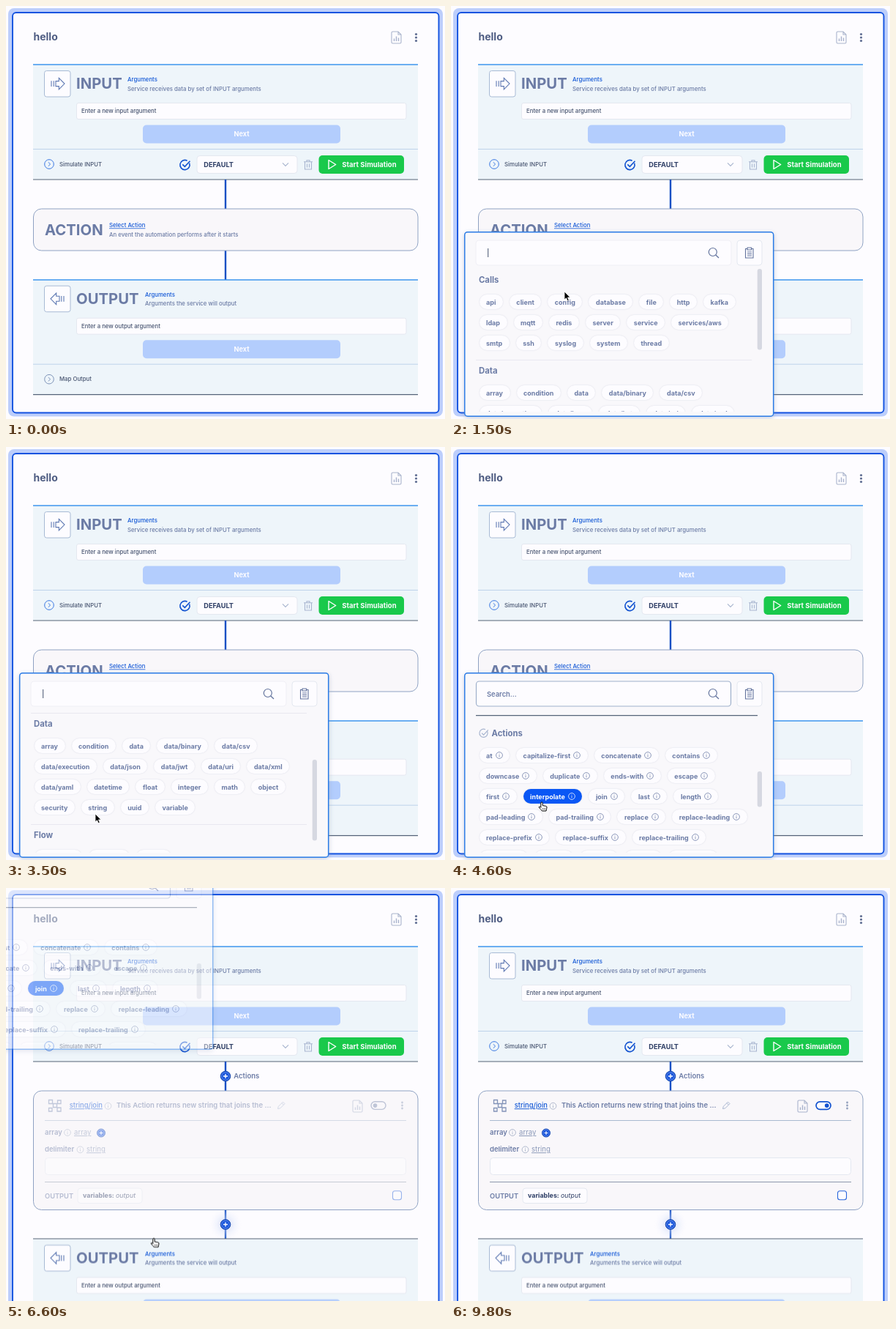
These frames come from a looping animation (600 by 564 pixels, 9900 ms). An HTML page:

```html
<!DOCTYPE html>
<html lang="en">
<head>
<meta charset="utf-8">
<title>Action picker</title>
<style>
html, body { margin: 0; width: 100%; height: 100%; overflow: hidden; background: #fdfcff; }
body { font-family: Inter, sans-serif; font-optical-sizing: none; }
#stage { position: relative; width: 600px; height: 564px; overflow: hidden; }
#stage > svg, #pop, #pop > svg { position: absolute; left: 0; top: 0; width: 600px; height: 564px; }
svg { display: block; overflow: visible; fill: none; }

/* type */
text { fill: #6b7ba5; }
.title { font-size: 20.3px; font-weight: 700; }
.small { font-size: 7.8px; font-weight: 500; }
.bold { font-size: 9.2px; font-weight: 700; }
.label { font-size: 9.5px; font-weight: 600; }
.type { font-size: 9.6px; fill: #8a98b8; text-decoration: underline; }
.link { fill: #1257d6; }
.dark { fill: #46536f; }
.navy { fill: #2f3f66; }
.white { fill: #fdfcff; }
.mid { text-anchor: middle; }

/* shapes */
.field { fill: #fdfcff; stroke: #e4e8f0; }
.card { fill: #f9f7fa; stroke: #8fa2c3; }
.wire { stroke: #1550c4; stroke-width: 2.4; }
.grey { stroke: #a9b6d0; }
.rule { stroke: #566479; stroke-width: 1.2; }
.sky { stroke: #3c96ee; stroke-width: 1.6; }

/* timeline: 1% is 99 ms */
.jump, .before, .after, .early, .late, .out, .on, .off, #kind, .arrow, .hand, .hot
  { animation: 9.9s step-end infinite; }
.before { animation-name: before; }
.after { animation-name: after; }
.out { animation-name: drop; }
.jump { animation-name: jump; }
.early { animation-name: early; }
.late { animation-name: late; }
.off { animation-name: off; }
.on { animation-name: on; }
.arrow { animation-name: arrow; }
.hand { animation-name: hand; }
#kind { animation-name: seen; }
.fade { animation: fade 9.9s linear infinite; }
#pop { animation: pop 9.9s linear infinite; }
.scroll { animation: scroll 9.9s ease-in-out infinite; }
#cursor { animation: move 9.9s ease-in-out infinite; }
.caret { animation: blink .99s step-end infinite; }
.hot.string { animation-name: string; }
.hot.interpolate { animation-name: interpolate; }
.hot.join { animation-name: join; }

@keyframes before { 0% { opacity: 1 } 65.15%, 100% { opacity: 0 } }
@keyframes after { 0% { opacity: 0 } 65.15%, 100% { opacity: 1 } }
@keyframes drop { 0% { transform: none } 65.15%, 100% { transform: translateY(105.5px) } }
@keyframes jump { 0% { transform: none } 65.15%, 100% { transform: translate(-158px, -340px) } }
@keyframes early { 0% { opacity: 1 } 40.4%, 100% { opacity: 0 } }
@keyframes late { 0% { opacity: 0 } 40.4%, 100% { opacity: 1 } }
@keyframes off { 0% { opacity: 1 } 70%, 100% { opacity: 0 } }
@keyframes on { 0% { opacity: 0 } 70%, 100% { opacity: 1 } }
@keyframes fade { 0%, 65.15% { opacity: 0 } 68.4%, 100% { opacity: 1 } }
@keyframes pop { 0%, 10.6% { opacity: 0 } 12.6%, 65.15% { opacity: 1 } 68.2%, 100% { opacity: 0 } }
@keyframes scroll { 0%, 21% { transform: none } 30%, 100% { transform: translateY(var(--by)) } }
@keyframes blink { 0% { opacity: 0 } 20% { opacity: 1 } 70%, 100% { opacity: 0 } }
@keyframes seen { 0% { opacity: 0 } 3% { opacity: 1 } 78%, 100% { opacity: 0 } }
@keyframes arrow { 0% { opacity: 1 } 8.1% { opacity: 0 } 11.1% { opacity: 1 } 36.4%, 100% { opacity: 0 } }
@keyframes hand { 0% { opacity: 0 } 8.1% { opacity: 1 } 11.1% { opacity: 0 } 36.4%, 100% { opacity: 1 } }
@keyframes move {
  0%, 3% { transform: translate(330px, 440px) }
  8.1%, 11.1% { transform: translate(165px, 301px) }
  14.1%, 19.2% { transform: translate(155px, 390px) }
  33.3%, 35.4% { transform: translate(122px, 501px) }
  37.4%, 49.5% { transform: translate(124px, 485px) }
  53.5%, 63.6% { transform: translate(196px, 483.5px) }
  66.2%, 70.7% { transform: translate(202px, 478.5px) }
  77.8%, 100% { transform: translate(206px, 580px) }
}
@keyframes string { 36.4% { background: #0a57f5; color: #fff } 40.4% { background: #fdfcff; color: #6b7ba5 } }
@keyframes interpolate { 40.4% { background: #0a57f5; color: #fff } 51.5% { background: #fdfcff; color: #6b7ba5 } }
@keyframes join { 51.5%, 100% { background: #0a57f5; color: #fff } }

/* picker */
.list { position: absolute; left: 34px; top: 358px; width: 385px; height: 196px; overflow: hidden; color: #6b7ba5; }
.list section { width: 377px; margin-top: -2px; padding-bottom: 9px; border-bottom: 1px solid #e9e8f0; }
.list section:first-child { margin-top: 0; }
.list.late section { margin-top: 17px; border: 0; }
h3 { margin: 0 0 0 4px; height: 32px; font: 700 11.3px/32px Inter, sans-serif; }
.late h3 { margin-left: 21.5px; }
.row { display: flex; align-items: center; gap: 9px; height: 28px; padding-left: 4.5px; }
.chip { display: flex; flex: none; align-items: center; gap: 4px; height: 19.5px; padding: 0 9.5px; border-radius: 10px;
  background: #fdfcff; box-shadow: 0 0 2px #d6d8e3; font-size: 9px; font-weight: 700; white-space: nowrap; }
.chip svg { width: 10px; height: 10px; opacity: .85; }
</style>
</head>
<body>
<div id="stage">
<svg viewBox="0 0 600 564">
  <defs>
    <radialGradient id="glow">
      <stop offset=".2" stop-color="#c9d5f5"/>
      <stop offset="1" stop-color="#f3f5fd" stop-opacity="0"/>
    </radialGradient>
    <g id="info" stroke="currentColor" stroke-width=".9">
      <circle cx="5" cy="5" r="4.4"/>
      <path d="M5 4.4V7.3M5 2.6V3.5"/>
    </g>
    <g id="plus">
      <circle r="6.8" fill="#1a56dc" stroke="#1747ab"/>
      <circle r="5.3" stroke="#88aaf0" stroke-width=".6"/>
      <path d="M-3 0H3M0-3V3" stroke="#fff" stroke-width="1.3"/>
    </g>
    <g id="report" stroke="#a9b3cc" stroke-width="1.1">
      <path d="M-6.5-6.5q0-1.5 1.5-1.5H2.5L6.5-4V6.5Q6.5 8 5 8H-5Q-6.5 8-6.5 6.5ZM2.5-8V-4H6.5"/>
      <path d="M-3 5V1.5M0 5V-1.5M3 5V.5" stroke-width="1.4"/>
    </g>
    <g id="more">
      <circle cy="-4.5" r="1.6"/><circle r="1.6"/><circle cy="4.5" r="1.6"/>
    </g>
    <g id="panel">
      <path d="M37 80H563V237H37Z" fill="#eef5fa"/>
      <path d="M37 195.5H563" stroke="#bed3ea"/>
      <path d="M37 237H563" class="rule"/>
      <rect x="52.5" y="88.5" width="35.5" height="35.5" rx="3" fill="#fdfcff" stroke="#a8bbd5"/>
      <rect x="96.5" y="132.5" width="450.5" height="22" rx="2.5" class="field"/>
      <rect x="187" y="162.5" width="270" height="25" rx="5" fill="#b3cdfd"/>
      <text x="322" y="178.3" class="bold white mid">Next</text>
      <circle cx="59" cy="216" r="6.3" stroke="currentColor"/>
      <path d="M57.8 213.3L60.6 216 57.8 218.7" stroke="currentColor"/>
    </g>
    <path id="way" d="M62 102.2V110M65.2 102.2V110M68 102.6H72.3V98.3L80 106.1 72.3 113.9V109.6H68Z"
      stroke="#5f79b3" stroke-width="1.1"/>
  </defs>

  <path d="M0 0H600V564H0Z" fill="#fdfcff"/>
  <g class="before">
    <rect x="3" y="3" width="594" height="557.5" rx="8" fill="#bccefb"/>
    <rect x="9" y="9" width="582.5" height="546.5" rx="5" fill="#fdfcff" stroke="#1353e0" stroke-width="1.9"/>
  </g>
  <g class="after">
    <rect x="3" y="3" width="594" height="663" rx="8" fill="#bccefb"/>
    <rect x="9" y="9" width="582.5" height="652" rx="5" fill="#fdfcff" stroke="#1353e0" stroke-width="1.9"/>
  </g>

  <text x="37.5" y="47" font-size="14" font-weight="700" style="fill:#4f5d83">hello</text>
  <use href="#report" x="533.5" y="43"/>
  <use href="#more" x="560.5" y="43" fill="#5f6d92"/>

  <use href="#panel" color="#3a78e2"/>
  <path d="M37 80H563" class="sky"/>
  <use href="#way"/>
  <text x="96" y="113.3" class="title">INPUT</text>
  <text x="166" y="103.2" class="small link">Arguments</text>
  <text x="166" y="115.8" class="small">Service receives data by set of INPUT arguments</text>
  <text x="103" y="146" class="small dark">Enter a new input argument</text>
  <text x="73" y="218.8" class="small dark">Simulate INPUT</text>
  <path d="M250.6 214.6A6.6 6.6 0 1 1 247.6 211.2M241.3 216.4L244.4 219.4 251.5 211.8" stroke="#1353d0" stroke-width="1.6"/>
  <rect x="261" y="204.5" width="137" height="24" rx="4" class="field"/>
  <text x="270.3" y="219.5" class="bold navy">DEFAULT</text>
  <path d="M378 214.3L382 218.3 386 214.3" class="grey" stroke-width="1.2"/>
  <path d="M407 212.8H419M411 212.6V210.8H415V212.6M408.5 213V223H417.5V213M411.5 215.5V220.5M414.5 215.5V220.5" class="grey" stroke-width="1.1"/>
  <rect x="427.5" y="204" width="116.5" height="25" rx="5" fill="#19c94b"/>
  <path d="M441 210.5V222.5L450.7 216.5Z" stroke="#fff" stroke-width="1.4" stroke-linejoin="round"/>
  <text x="459.3" y="219.8" class="bold white" style="font-size:9.5px">Start Simulation</text>
  <path d="M300 237V277" class="wire"/>

  <g class="before">
    <path d="M300 334V374" class="wire"/>
    <rect x="37.5" y="277" width="525.5" height="57" rx="11" class="card"/>
    <text x="53" y="312.5" class="title">ACTION</text>
    <text x="141" y="302.4" class="small link" text-decoration="underline">Select Action</text>
    <text x="141" y="315" class="small">An event the automation performs after it starts</text>
  </g>

  <g class="after">
    <path d="M300 439V479" class="wire"/>
    <circle cx="300" cy="459.5" r="22" fill="url(#glow)" opacity=".6"/>
    <use href="#plus" x="300" y="257"/>
    <use href="#plus" x="300" y="459.5"/>
    <text x="311.3" y="260.4" class="label">Actions</text>
    <rect x="37.5" y="277" width="525.5" height="162.5" rx="11" class="card"/>
    <g class="fade">
      <path d="M58.5 289.5h5v5h-5zM64.5 294.5h5v5h-5zM70.5 290h4.5v4.5h-4.5zM58.5 300.5h4.5v4.5h-4.5zM70 300h5v5h-5z" stroke="#8293b8" stroke-width="1.3"/>
      <text x="86.7" y="300.2" class="link" font-size="9.4" font-weight="500" text-decoration="underline">string/join</text>
      <use href="#info" x="134.5" y="292.7" color="#a9b3c8"/>
      <text x="151" y="300.2" class="label">This Action returns new string that joins the ...</text>
      <path d="M371.5 301.5L372.3 298.3 378.5 292.1 381 294.6 374.8 300.8ZM377 293.7L379.4 296.1" class="grey"/>
      <use href="#report" x="480.5" y="298"/>
      <g class="off">
        <rect x="499" y="291.8" width="20" height="10.6" rx="5.3" stroke="#7c8bb0" stroke-width="1.4"/>
        <circle cx="504.5" cy="297.1" r="2.8" fill="#7c8bb0"/>
      </g>
      <g class="on">
        <rect x="499" y="291.8" width="20" height="10.6" rx="5.3" fill="#fdfcff" stroke="#1353d0" stroke-width="1.7"/>
        <circle cx="513.7" cy="297.1" r="2.9" fill="#1353d0"/>
      </g>
      <use href="#more" transform="translate(541.5 297) scale(.9)" fill="#94a1bd"/>
      <path d="M53 317.5H547" stroke="#a9bad0"/>
      <text x="53" y="337" class="label">array</text>
      <use href="#info" x="79" y="329" color="#a9b3c8"/>
      <text x="93" y="337" class="type">array</text>
      <use href="#plus" transform="translate(130 334.5) scale(.82)"/>
      <text x="53" y="360.2" class="label">delimiter</text>
      <use href="#info" x="96.5" y="352.3" color="#a9b3c8"/>
      <text x="110" y="360.2" class="type">string</text>
      <rect x="53.5" y="368.5" width="493" height="23" rx="4" class="field"/>
      <path d="M53 401.5H547" stroke="#8d99ac"/>
      <text x="53" y="423.5" class="label" style="font-size:9.3px">OUTPUT</text>
      <rect x="98" y="410" width="88" height="20.5" rx="4" class="field"/>
      <text x="105" y="423.2" class="navy" font-size="8.9" font-weight="700">variables:</text>
      <text x="150" y="423.2" class="navy" font-size="8.9" font-style="italic">output</text>
      <rect x="528.5" y="413.7" width="12" height="12" rx="3" fill="#fdfcff" stroke="#2a66dc" stroke-width="1.1"/>
    </g>
  </g>

  <g class="out">
    <g transform="translate(0 293.7)">
      <use href="#panel" color="#7d93b8"/>
      <path d="M37 80H563" class="sky before"/>
      <path d="M37 80H563" class="rule after"/>
      <use href="#way" transform="matrix(-1 0 0 1 141 0)"/>
      <text x="96" y="113.3" class="title">OUTPUT</text>
      <text x="190" y="103.2" class="small link">Arguments</text>
      <text x="190" y="115.8" class="small">Arguments the service will output</text>
      <text x="103" y="146" class="small dark">Enter a new output argument</text>
      <text x="73" y="218.8" class="small dark">Map Output</text>
    </g>
  </g>
</svg>

<div id="pop">
<div class="jump">
  <svg width="600" height="564" viewBox="0 0 600 564">
    <rect x="18.7" y="308.7" width="422" height="251.5" rx="4" fill="#f9f8fb" stroke="#2b7ce6" stroke-width="1.5"
      style="filter:drop-shadow(0 2px 3px #8090b066)"/>
    <g class="early">
      <rect x="34" y="320" width="349" height="34" rx="4" fill="#fdfcff" stroke="#f0eff5"/>
      <path d="M50.7 331V343" class="caret" stroke="#46536f"/>
    </g>
    <g class="late">
      <rect x="34.5" y="320" width="348" height="34" rx="4" fill="#fdfcff" stroke="#9fb1cb" stroke-width="1.2"/>
      <text x="49" y="340.5" font-size="9.4" font-weight="600">Search...</text>
      <path d="M34 366.7H419" class="rule"/>
      <path d="M49.7 388.6A5.6 5.6 0 1 1 47 385.7M42 390.7L44.6 393.2 50.8 386.4" class="grey" stroke-width="1.2"/>
      <rect x="418.7" y="443" width="6.3" height="48.5" rx="3" fill="#d6d8e1"/>
    </g>
    <g class="early">
      <rect x="418.7" y="359" width="6.3" height="110.5" rx="3" fill="#d6d8e1" class="scroll" style="--by:68px"/>
    </g>
    <circle cx="357.8" cy="336" r="5.5" stroke="#63739d" stroke-width="1.2"/>
    <path d="M361.8 340L366 344" stroke="#63739d" stroke-width="1.3"/>
    <rect x="391" y="320" width="34" height="34" rx="4" class="field"/>
    <path d="M405 331.5H402.5V344H413V331.5H410.5M405 330H410.5V333H405ZM405 336H411M405 338.5H411M405 341H411" stroke="#63739d" stroke-width="1.1"/>
  </svg>
  <div class="list early"><div class="scroll" id="groups" style="--by:-120px"></div></div>
  <div class="list late" id="actions"></div>
</div>
</div>

<svg viewBox="0 0 600 564">
  <g id="cursor"><g id="kind" stroke-linejoin="round">
    <path class="arrow" d="M0 0V11L2.5 8.8 4.2 12.7 6.2 11.8 4.5 8H7.9Z" fill="#000" stroke="#fff" stroke-width=".8"/>
    <g class="hand" stroke="#000">
      <path d="M-1.2 7.4V1.2a1.2 1.2 0 0 1 2.4 0V4.6L5.6 5.4A1.7 1.7 0 0 1 7 7.2C7 9 6.2 10 6 12H.4C-.6 10.2-3.2 8.6-3.8 6.8c.2-1 1.4-1 2.6.6Z" fill="#fff"/>
      <path d="M1.2 8.4V10.2M3 8.4V10.2M4.7 8.4V10.2" stroke-width=".7"/>
    </g>
  </g></g>
</svg>
</div>

<script>
const groups = {
  Calls: ["api client config database file http kafka", "ldap mqtt redis server service services/aws", "smtp ssh syslog system thread"],
  Data: ["array condition data data/binary data/csv", "data/execution data/json data/jwt data/uri data/xml",
    "data/yaml datetime float integer math object", "security string uuid variable"],
  Flow: ["conditions iterators switch"]
};
const actions = {
  Actions: ["at capitalize-first concatenate contains", "downcase duplicate ends-with escape", "first interpolate join last length",
    "pad-leading pad-trailing replace replace-leading", "replace-prefix replace-suffix replace-trailing",
    "reverse slice split trim to-atom"]
};
const hot = ["string", "interpolate", "join"];
const icon = '<svg viewBox="0 0 10 10"><use href="#info"/></svg>';

const chip = (name, mark) =>
  `<span class="chip${hot.includes(name) ? " hot " + name : ""}">${name}${mark}</span>`;
const row = (names, mark) =>
  `<div class="row">${names.split(" ").map(n => chip(n, mark)).join("")}</div>`;
const fill = (id, data, mark = "") => {
  document.getElementById(id).innerHTML = Object.entries(data).map(([head, rows]) =>
    `<section><h3>${head}</h3>${rows.map(r => row(r, mark)).join("")}</section>`).join("");
};
fill("groups", groups);
fill("actions", actions, icon);
</script>
</body>
</html>
```
